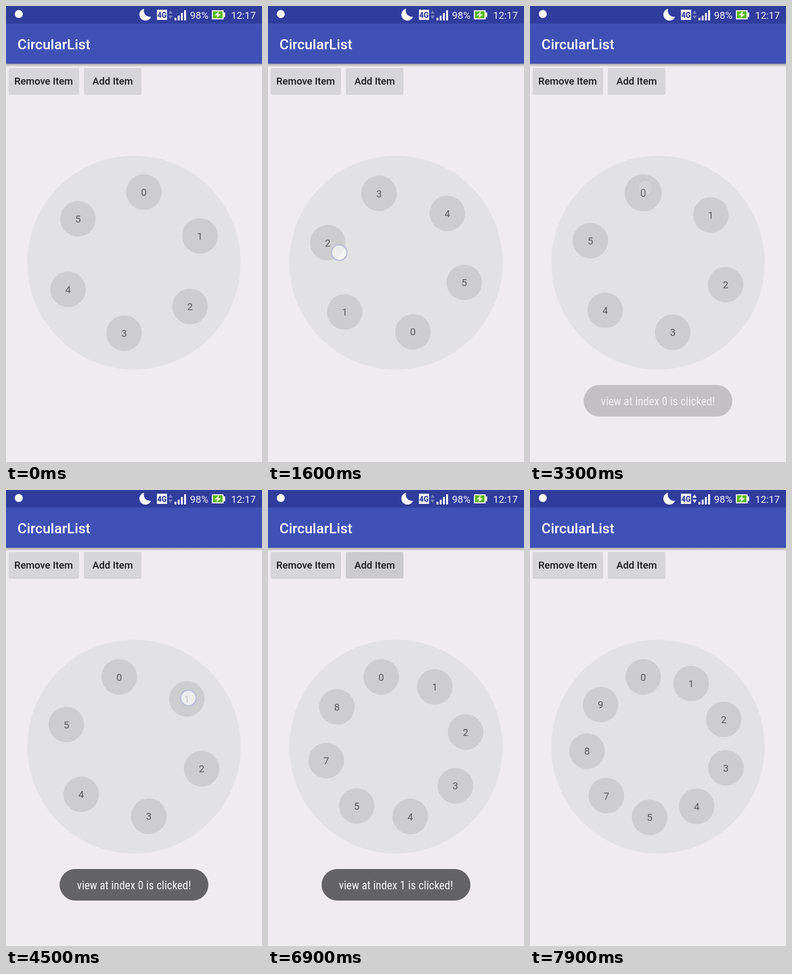
An HTML page that plays this animation: 480x853 px, repeating every 8 s.

```html
<!DOCTYPE html>
<html lang="en">
<head>
<meta charset="utf-8">
<title>CircularList</title>
<style>
  html, body { margin: 0; width: 100%; height: 100%; overflow: hidden; background: #eeecef; }
  svg { display: block; width: 100vw; height: 100vh; font-family: Roboto, sans-serif; }
  text { font-size: 18.67px; }
  .medium { font-weight: 500; }
  .mid { text-anchor: middle; }
  .item circle { fill: #cdccce; }
  .item text { fill: #59585a; }
  #toastText { font-family: "Roboto Condensed", Roboto, sans-serif; font-stretch: 75%; font-size: 21.33px; fill: #f6f6f6; }
</style>
</head>
<body>
<svg viewBox="0 0 480 853">
  <defs>
    <linearGradient id="shade" x2="0" y2="1">
      <stop stop-color="#000" stop-opacity=".3"/>
      <stop offset="1" stop-color="#000" stop-opacity="0"/>
    </linearGradient>
  </defs>
  <rect width="480" height="853" fill="#eeecef"/>
  <rect y="108" width="480" height="6" fill="url(#shade)"/>
  <rect width="480" height="108" fill="#3f51b5"/>
  <rect width="480" height="33" fill="#303d9d"/>

  <g fill="#fff">
    <circle cx="24" cy="15" r="7.5"/>
    <path d="M259 5A11.3 11.3 0 1 0 272 20A11.5 11.5 0 0 1 259 5"/>
    <rect x="283" y="7" width="19" height="19"/>
    <text x="292.5" y="22" class="mid" style="font-size:14px;font-weight:800" fill="#303d9d">4G</text>
    <path id="arrows" d="M304.500 14.500L308.500 8L312.500 14.500ZM304.500 18L308.500 24.500L312.500 18Z"/>
    <path d="M316 22h3.500v5h-3.500zM322 18h3.500v9h-3.500zM328 13h3.500v14h-3.500zM334 8h3.500v19h-3.500z"/>
    <text x="345" y="24" fill="#f0f0fa">98%</text>
    <path d="M386 8h22v4h3v9h-3v4h-22z"/>
    <rect x="388" y="10" width="18" height="13" fill="#5cb60a"/>
    <path d="M399 10L391 17.500H396L394.500 23L403 15.500H398Z"/>
    <text x="422" y="24" fill="#f0f0fa">12:17</text>
    <text x="21.500" y="81" class="medium" style="font-size:26.67px">CircularList</text>
  </g>

  <g class="medium mid" fill="#19181a">
    <rect x="5" y="117" width="132" height="48.500" rx="3" fill="#c6c5c7"/>
    <rect x="146" y="117" width="108" height="48.500" rx="3" fill="#c6c5c7"/>
    <rect x="5" y="116" width="132" height="48.500" rx="3" fill="#d6d5d7"/>
    <rect id="add" x="146" y="116" width="108" height="48.500" rx="3" fill="#d6d5d7"/>
    <text x="70.500" y="147">Remove Item</text>
    <text x="200" y="147">Add Item</text>
  </g>

  <circle cx="240" cy="480" r="200" fill="#e2e1e3"/>
  <g id="ring"></g>
  <g id="toast">
    <rect x="100.500" y="709" width="279" height="59" rx="29.500" fill="#636264"/>
    <text id="toastText" class="mid" x="240" y="746.500"></text>
  </g>
  <circle id="dot" r="14.500" fill="#fff" fill-opacity=".65" stroke="#b3b8dc" stroke-width="2"/>
</svg>
<script>
const LOOP = 8000, STEP = 100, CX = 240, CY = 480, RADIUS = 133.3;
const LABELS = '012345789';
const ADDS = [5900, 6740, 7490];
const TOASTS = [{ from: 3150, to: 5250 }, { from: 5280, to: 7400 }];
const ITEM_TAPS = [3150, 4550];
const TAPS = [
  { from: 3050, to: 3250, x: 216, y: 340 },
  { from: 4450, to: 4650, x: 342, y: 389 },
  { from: 5700, to: 5880, x: 213.5, y: 142 },
  { from: 6650, to: 6760, x: 213, y: 139 },
  { from: 7350, to: 7490, x: 213, y: 136 }
];
const DRAG = [850, 1600, 2200, 2600];
const LIST_ANGLE = [8, 166.2, 295.7, 348];
const FINGER_ANGLE = [-215, -80, 133, 187];
const FINGER_RADIUS = [120, 108, 139, 131];

const $ = id => document.getElementById(id);
const set = (el, attrs) => { for (const k in attrs) el.setAttribute(k, attrs[k]); };
const clamp = x => Math.max(0, Math.min(1, x));
const ramp = (t, from, length) => clamp((t - from) / length);
const smooth = x => (1 - Math.cos(Math.PI * x)) / 2;
const overshoot = x => (x - 1) ** 2 * (3 * (x - 1) + 2) + 1;
const polar = (degrees, r) => {
  const a = degrees * Math.PI / 180;
  return { x: CX + r * Math.sin(a), y: CY - r * Math.cos(a) };
};

// Smooth curve through the values at the drag times, at rest at both ends
function alongDrag(values, t) {
  const last = DRAG.length - 1;
  if (t <= DRAG[0]) return values[0];
  if (t >= DRAG[last]) return values[last];
  const slope = i => i % last ? (values[i + 1] - values[i - 1]) / (DRAG[i + 1] - DRAG[i - 1]) : 0;
  const i = DRAG.findIndex(d => d > t) - 1;
  const span = DRAG[i + 1] - DRAG[i], u = (t - DRAG[i]) / span, v = 1 - u;
  return values[i] * v * v * (1 + 2 * u) + values[i + 1] * u * u * (3 - 2 * u)
    + span * u * v * (slope(i) * v - slope(i + 1) * u);
}

$('ring').innerHTML = [...LABELS].map(label =>
  `<g class="item"><circle r="33.3"/><text class="mid" y="7">${label}</text></g>`).join('');
const items = [...$('ring').children];

function drawRing(t) {
  const added = ADDS.filter(a => t >= a).length;
  const count = 6 + added;
  let spacing = 360 / count;
  if (added) {
    const before = 360 / (count - 1);
    spacing = before + (spacing - before) * overshoot(ramp(t, ADDS[added - 1], 500));
  }
  const start = alongDrag(LIST_ANGLE, t);
  items.forEach((item, i) => {
    const { x, y } = polar(start + i * spacing, RADIUS);
    const bump = i < ITEM_TAPS.length ? Math.sin(Math.PI * ramp(t, ITEM_TAPS[i] - 50, 300)) : 0;
    set(item, {
      transform: `translate(${x} ${y}) scale(${1 + 0.05 * bump})`,
      display: i < count ? 'inline' : 'none'
    });
  });
}

function drawDot(t) {
  let spot, opacity = 1;
  if (t >= DRAG[0] && t < 2650) {
    spot = polar(alongDrag(FINGER_ANGLE, t), alongDrag(FINGER_RADIUS, t));
  } else {
    spot = TAPS.find(tap => t >= tap.from && t < tap.to + 60);
    if (spot) opacity = 1 - ramp(t, spot.to, 60);
  }
  set($('dot'), spot ? { cx: spot.x, cy: spot.y, opacity } : { opacity: 0 });
}

function drawToast(t) {
  const index = t < TOASTS[1].from ? 0 : 1, { from, to } = TOASTS[index];
  $('toastText').textContent = `view at index ${index} is clicked!`;
  set($('toast'), { opacity: smooth(ramp(t, from, 400)) * (1 - smooth(ramp(t, to, 400))) });
}

function drawButton(t) {
  const pressed = Math.max(...ADDS.map(a => ramp(t, a - 50, 100) * (1 - ramp(t, a + 200, 200))));
  const grey = Math.round(214 - 11 * pressed);
  set($('add'), { fill: `rgb(${grey},${grey - 1},${grey + 1})` });
}

function frame(now) {
  const t = Math.floor(now % LOOP / STEP) * STEP;
  drawRing(t);
  drawToast(t);
  drawButton(t);
  drawDot(t);
  set($('arrows'), { fill: t < 7800 ? '#7780bd' : '#fff' });
  requestAnimationFrame(frame);
}

drawToast(0);
// Without a condensed face the regular one is set a size smaller
if ($('toastText').getComputedTextLength() > 225) $('toastText').style.fontSize = '18.9px';
requestAnimationFrame(frame);
</script>
</body>
</html>
```
